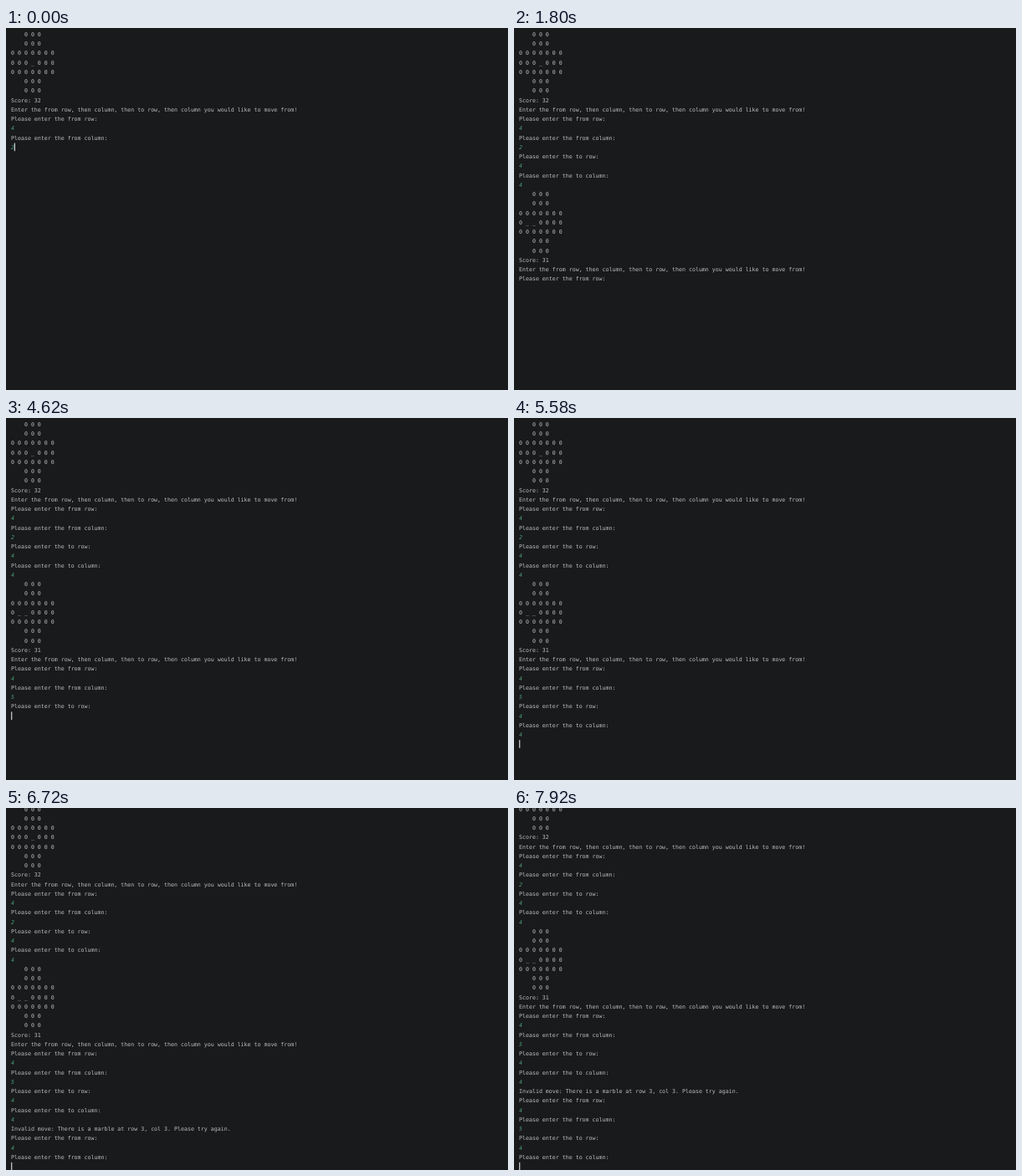
An HTML page that plays this animation: 600x433 px, repeating every 8000 ms.

```html
<!DOCTYPE html>
<html lang="en">
<head>
<meta charset="utf-8">
<title>Marble solitaire console</title>
<style>
  html, body { margin: 0; width: 100%; height: 100%; overflow: hidden; background: #191a1b; }
  svg { display: block; width: 600px; height: 433px; }
  text {
    font: 6.62px "DejaVu Sans Mono", monospace;
    white-space: pre;
    text-rendering: geometricPrecision;
    fill: #bcbec1;
  }
  .input { fill: #4c9f78; font-style: italic; }
  #caret { fill: #d0d2d5; }
</style>
</head>
<body>
<svg viewBox="0 0 600 433">
  <rect width="600" height="433" fill="#191a1b"/>
  <g id="console"><rect id="caret" width="1.2" height="9.6"/></g>
</svg>
<script>
const LOOP = 8000, LEFT = 6, PITCH = 11.25, FIRST_MID = 7.5, LAST_MID = 428.75, CHAR = 3.985;

const ask = (what, answer) => [`Please enter the ${what}:`, answer];
const move = (fromRow, fromCol, toRow, toCol) => [
  ...ask("from row", fromRow), ...ask("from column", fromCol),
  ...ask("to row", toRow), ...ask("to column", toCol),
];
const board = (middle, score) => {
  const arm = "    0 0 0", full = "0 0 0 0 0 0 0";
  return [arm, arm, full, middle, full, arm, arm, `Score: ${score}`,
    "Enter the from row, then column, then to row, then column you would like to move from!"];
};

const lines = [
  ...board("0 0 0 _ 0 0 0", 32), ...move("4", "2", "4", "4"),
  ...board("0 _ _ 0 0 0 0", 31), ...move("4", "5", "4", "4"),
  "Invalid move: There is a marble at row 3, col 3. Please try again.",
  ...move("4", "5", "4", ""),
];

// [start ms, visible lines, caret]
const HIDDEN = 0, NEW_LINE = 1, AFTER_INPUT = 2;
const states = [
  [0, 13, AFTER_INPUT], [240, 14, NEW_LINE], [540, 15, AFTER_INPUT],
  [840, 16, NEW_LINE], [1140, 17, AFTER_INPUT], [1320, 17, NEW_LINE],
  [1440, 27, NEW_LINE], [1800, 27, HIDDEN], [2100, 27, NEW_LINE],
  [2400, 27, HIDDEN], [2700, 27, NEW_LINE], [3000, 27, HIDDEN],
  [3360, 27, NEW_LINE], [3660, 27, HIDDEN], [3720, 28, AFTER_INPUT],
  [3960, 29, NEW_LINE], [4320, 30, AFTER_INPUT], [4620, 31, NEW_LINE],
  [4920, 32, AFTER_INPUT], [5220, 33, NEW_LINE], [5460, 34, AFTER_INPUT],
  [5580, 34, NEW_LINE], [5700, 36, NEW_LINE], [6060, 36, HIDDEN],
  [6360, 37, AFTER_INPUT], [6600, 37, NEW_LINE], [6720, 38, NEW_LINE],
  [7020, 39, AFTER_INPUT], [7320, 40, NEW_LINE], [7560, 41, AFTER_INPUT],
  [7800, 41, NEW_LINE], [7920, 42, NEW_LINE],
];

const consoleGroup = document.getElementById("console");
const caret = document.getElementById("caret");
const midY = row => FIRST_MID + row * PITCH;

const rows = lines.map((line, row) => {
  const text = document.createElementNS("http://www.w3.org/2000/svg", "text");
  text.textContent = line;
  text.setAttribute("x", LEFT);
  text.setAttribute("y", midY(row) + 2.4);
  if (/^\d$/.test(line)) text.setAttribute("class", "input");
  consoleGroup.insertBefore(text, caret);
  return text;
});

function draw(ms) {
  const [, count, caretMode] = states.filter(([start]) => start <= ms).pop();
  const typed = caretMode === AFTER_INPUT;
  const caretRow = typed ? count - 1 : count;
  const scroll = Math.max(0, midY(caretRow) - LAST_MID);

  rows.forEach((text, row) => text.setAttribute("visibility", row < count ? "visible" : "hidden"));
  caret.setAttribute("visibility", caretMode === HIDDEN ? "hidden" : "visible");
  caret.setAttribute("x", LEFT + (typed ? CHAR - 0.2 : 0.1));
  caret.setAttribute("y", midY(caretRow) - 4.9);
  consoleGroup.setAttribute("transform", `translate(0 ${-scroll})`);
}

const began = performance.now();
function tick() {
  draw((performance.now() - began) % LOOP);
  requestAnimationFrame(tick);
}
tick();
</script>
</body>
</html>
```
